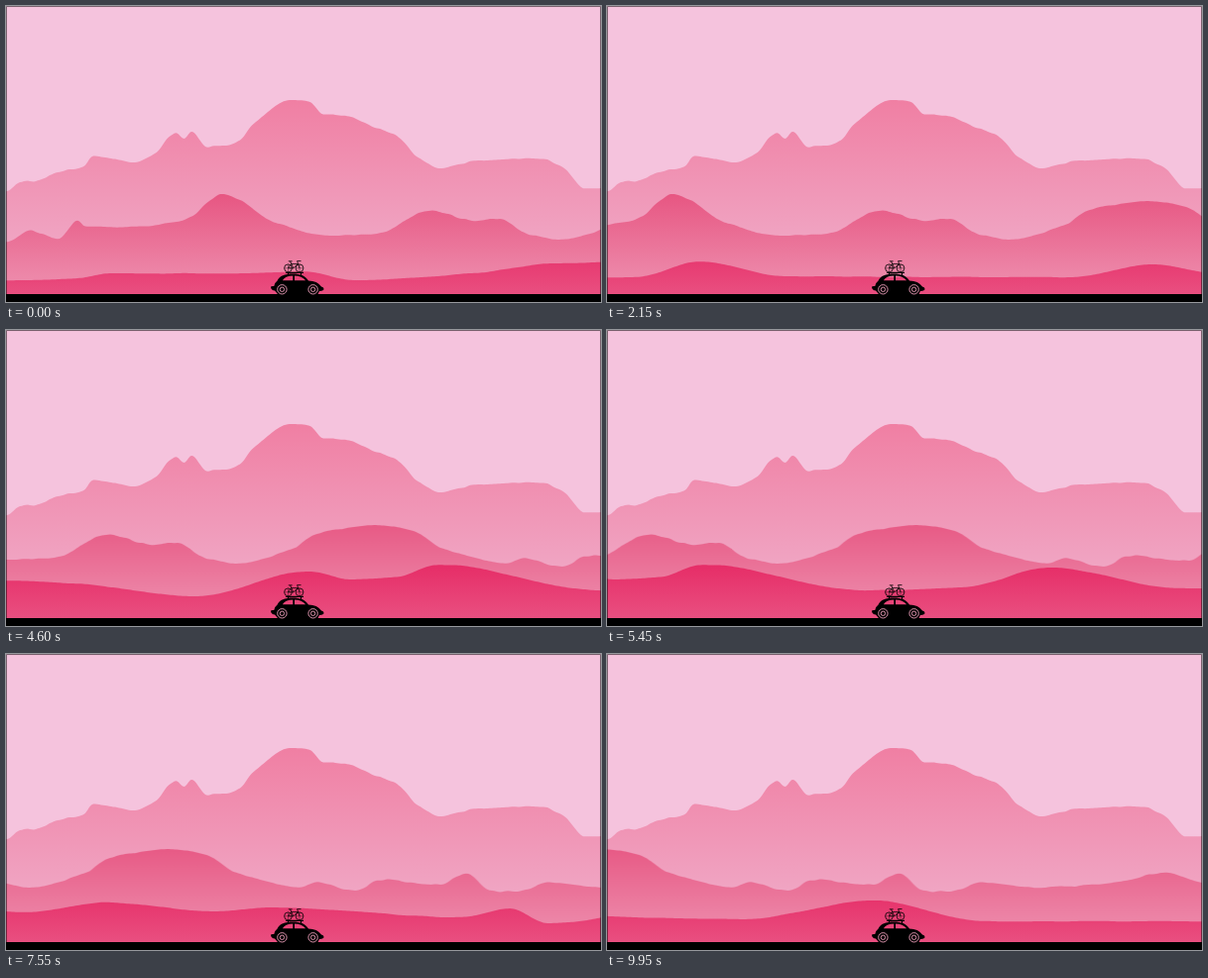
Write an HTML page that moves like this. It is 600 by 299 pixels and loops after 10 s.

```html
<!DOCTYPE html>
<html lang="en">
<head>
<meta charset="utf-8">
<title>Road trip</title>
<style>
  html, body { margin: 0; width: 100%; height: 100%; overflow: hidden; background: #f5c3dd; }
  svg { display: block; width: 100%; height: 100%; }
  #mid { --run: -707px; }
  #near { --run: -4000px; }
  #mid, #near { animation: drive 10s steps(200, end) infinite; }
  @keyframes drive { to { transform: translateX(var(--run)); } }
</style>
</head>
<body>
<svg viewBox="0 0 600 299" preserveAspectRatio="none">
  <defs>
    <linearGradient id="gFar" gradientUnits="userSpaceOnUse" x1="0" y1="95" x2="0" y2="240">
      <stop offset="0" stop-color="#f07fa3"/><stop offset="1" stop-color="#f0a5c3"/>
    </linearGradient>
    <linearGradient id="gMid" gradientUnits="userSpaceOnUse" x1="0" y1="190" x2="0" y2="291">
      <stop offset="0" stop-color="#e75682"/><stop offset="1" stop-color="#ee92b1"/>
    </linearGradient>
    <linearGradient id="gNear" gradientUnits="userSpaceOnUse" x1="0" y1="237" x2="0" y2="291">
      <stop offset="0" stop-color="#e62d67"/><stop offset="1" stop-color="#e94f80"/>
    </linearGradient>
  </defs>

  <path id="far" fill="url(#gFar)"/>
  <path id="mid" fill="url(#gMid)"/>
  <path id="near" fill="url(#gNear)"/>

  <path d="M0 291H600V299H0z"/>
  <path d="M.5 299V.5H599.5V299" fill="none" stroke="#000" stroke-opacity=".5"/>

  <g id="car">
    <path fill-rule="evenodd" d="M267 284Q267 282.6 270.3 283Q271 279.5 273.6 277.6C276 272.5 281 270.5 289 270.5C297 270.5 301.5 272.5 305 277.4Q314 277.6 318 283.4Q320.8 284 320.4 286.6Q319.5 288.2 316 288L314.5 291H274L271 287.6Q267.5 287.4 267 284z
      M278.8 277.2H289.3V272.4Q281.4 272.4 278.8 277.2zM291 277.2H302.2Q298.4 272.5 291 272.4z"/>
    <g fill="none" stroke="#ee9fba" stroke-width=".9">
      <circle cx="278.4" cy="286.3" r="4.7"/><circle cx="309.6" cy="286.3" r="4.7"/>
      <circle cx="278.4" cy="286.3" r="2.2"/><circle cx="309.6" cy="286.3" r="2.2"/>
    </g>
    <path d="M282 269.4H300M284.5 269V271.5M297.5 269V272" fill="none" stroke="#000" stroke-width="1.1"/>
    <g fill="none" stroke="#000" stroke-width=".8">
      <circle cx="284.5" cy="264.8" r="3.9"/><circle cx="296" cy="264.8" r="3.9"/>
      <path d="M284.5 264.8L287.4 260.6H294.4L289.8 264.8L286.6 258M284.5 264.8H289.8M296 264.8L293.6 257.6H297.5M284.8 257.8H288.6"/>
    </g>
    <path d="M284.5 261V268.7M280.5 264.8H288.5M296 261V268.7M292 264.8H300" stroke="#000" stroke-width=".35"/>
  </g>
</svg>
<script>
  const hash = n => {
    const v = Math.sin(n * 127.1 + 11.7) * 43758.5453;
    return (v - Math.floor(v)) * 2 - 1;
  };

  function noise(x) {
    const i = Math.floor(x), f = x - i;
    return hash(i) + (hash(i + 1) - hash(i)) * f * f * (3 - 2 * f);
  }

  // Monotone curve through the key points, so crests and dips stay where they are set.
  function curve(pts) {
    const rise = pts.slice(1).map(([x, y], i) => (y - pts[i][1]) / (x - pts[i][0]));
    const slope = pts.map((_, i) => {
      const a = rise[i - 1] || 0, b = rise[i] || 0;
      return a * b > 0 ? 2 * a * b / (a + b) : 0;
    });
    let k = 0;
    return x => {
      while (k < pts.length - 2 && x > pts[k + 1][0]) k++;
      const [x0, y0] = pts[k], [x1, y1] = pts[k + 1];
      const w = x1 - x0, t = (x - x0) / w, u = 1 - t;
      return u * u * (1 + 2 * t) * y0 + t * t * (3 - 2 * t) * y1
        + w * t * u * (u * slope[k] - t * slope[k + 1]);
    };
  }

  function ridge(id, rough, grain, keys) {
    const pts = keys.trim().split(/\s+/).map(p => p.split(',').map(Number));
    const height = curve(pts), end = pts[pts.length - 1][0];
    let d = 'M0 292';
    for (let x = 0; x <= end; x += 2) {
      d += `L${x} ${(height(x) + rough * noise(x / grain)).toFixed(2)}`;
    }
    document.getElementById(id).setAttribute('d', d + 'V292z');
  }

  ridge('far', .8, 7, `
    0,187 14,178 34,176 50,168 78,162 88,151 130,158 150,149 171,128 179,134 187,127
    203,142 222,141 236,135 250,119 288,95 306,97 320,110 340,110 370,122 397,133
    412,150 438,164 472,157 538,154 560,162 584,184 600,184`);

  ridge('mid', .8, 8, `
    0,238 25,227 52,235 72,217 80,222 130,223 180,216 219,190 270,218 325,232 370,231
    427,207 475,217 498,215 522,229 557,236 618,219 635,207 701,197 734,202 769,222
    830,235 848,231 885,239 912,228 971,233 998,222 1022,239 1048,240 1082,231
    1130,236 1215,231 1266,221 1310,232`);

  ridge('near', .4, 20, `
    0,277 60,276 110,270 230,270 300,268 350,277 480,269 550,260 600,259 800,275
    890,274 955,258 1040,273 1330,274 1410,261 1480,271 1840,253 1910,256 2030,269
    2145,244 2190,252 2235,249 2277,237 2440,263 2540,260 2627,240 2755,261 2870,262
    2980,257 3040,261 3120,251 3231,260 3290,256 3478,266 3529,257 3566,272 3710,254
    3800,264 3902,242 3970,264 4115,268 4250,249 4360,270 4600,270`);
</script>
</body>
</html>
```
